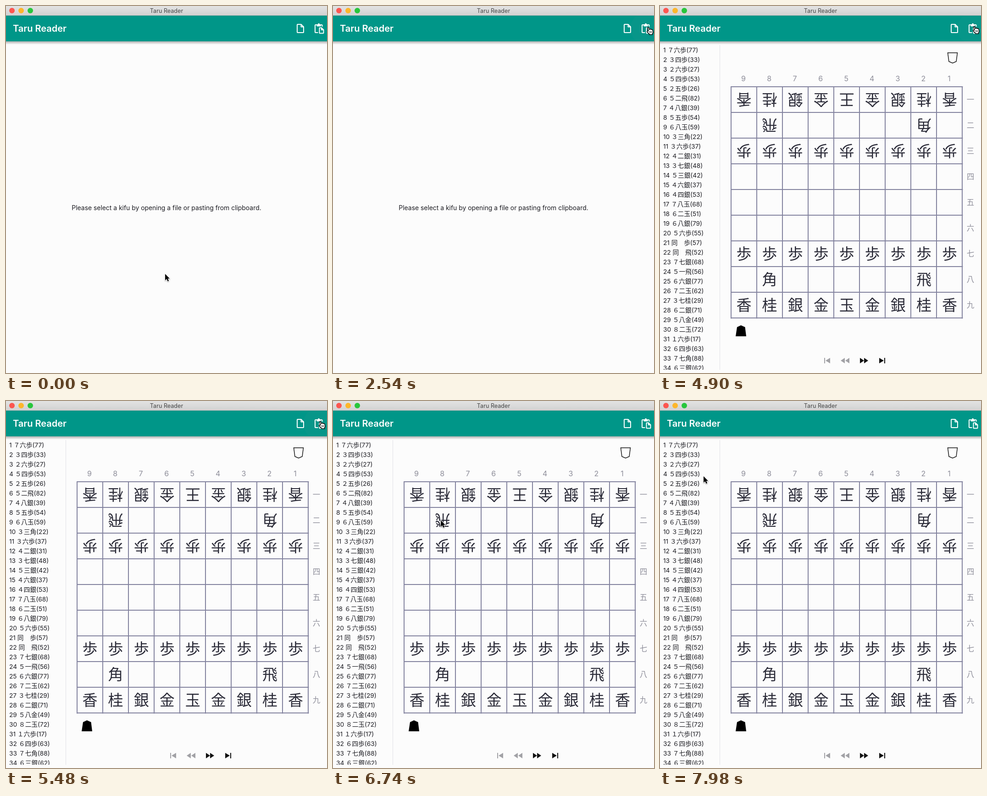
Recreate the animation shown at these times as an HTML page with a canvas. Size 700x800 px, loop 8 s.

```html
<!DOCTYPE html>
<html lang="ja">
<head>
<meta charset="utf-8">
<title>Taru Reader</title>
<style>
html, body { margin: 0; width: 100%; height: 100%; overflow: hidden; background: #fcfcfc; }
canvas { display: block; }
</style>
</head>
<body>
<canvas id="stage" width="700" height="800"></canvas>
<script>
const ctx = document.getElementById('stage').getContext('2d');
const LOOP = 8000, BOARD_AT = 4450;
const APP = 'Taru Reader';
const FONT = 'Inter, "Noto Sans CJK JP", "Noto Sans CJK", sans-serif';
const KANJI = '"Noto Sans CJK JP", "Noto Sans CJK", sans-serif';
const PAPER = '#fcfcfc', INK = '#1c1c22', LABEL = '#8e8e9a';
const LEFT = 155, TOP = 176, CELL = 56.05;

const MOVES = ('７六歩(77) ３四歩(33) ２六歩(27) ５四歩(53) ２五歩(26) ５二飛(82) ４八銀(39) ' +
  '５五歩(54) ６八玉(59) ３三角(22) ３六歩(37) ４二銀(31) ３七銀(48) ５三銀(42) ４六銀(37) ' +
  '４四銀(53) ７八玉(68) ６二玉(51) ６八銀(79) ５六歩(55) 同　歩(57) 同　飛(52) ７七銀(68) ' +
  '５一飛(56) ６六銀(77) ７二玉(62) ３七桂(29) ６二銀(71) ５八金(49) ８二玉(72) １六歩(17) ' +
  '６四歩(63) ７七角(88) ６三銀(62)').split(' ');

const SETUP = ['香桂銀金王金銀桂香', ' 飛     角 ', '歩歩歩歩歩歩歩歩歩', '', '', '',
  '歩歩歩歩歩歩歩歩歩', ' 角     飛 ', '香桂銀金玉金銀桂香'];

// Pointer stops: time, x, y
const PATH = [[0, 347, 584], [1000, 347, 584], [2110, 685, 46], [3000, 685, 46], [3500, 683, 44],
  [5900, 683, 44], [6650, 235, 260], [7000, 235, 260], [7750, 95, 164], [LOOP, 95, 164]];

function text(str, x, y, font, color, align = 'center') {
  ctx.font = font;
  ctx.fillStyle = color;
  ctx.textAlign = align;
  ctx.fillText(str, x, y);
}

function polygon(points) {
  ctx.beginPath();
  points.forEach(([x, y]) => ctx.lineTo(x, y));
  ctx.closePath();
}

function fillPolygon(points, color) {
  polygon(points);
  ctx.fillStyle = color;
  ctx.fill();
}

function disc(x, y, r, color) {
  ctx.beginPath();
  ctx.arc(x, y, r, 0, Math.PI * 2);
  ctx.fillStyle = color;
  ctx.fill();
}

function verticalFade(y0, y1, from, to) {
  const fade = ctx.createLinearGradient(0, y0, 0, y1);
  fade.addColorStop(0, from);
  fade.addColorStop(1, to);
  ctx.fillStyle = fade;
  ctx.fillRect(0, y0, 700, y1 - y0);
}

function strokePath(d, color, width) {
  ctx.strokeStyle = color;
  ctx.lineWidth = width;
  ctx.stroke(new Path2D(d));
}

function drawHeader(hover) {
  verticalFade(0, 21, '#e3e3e3', '#d1d1d1');
  ctx.fillStyle = '#b6b6b6';
  ctx.fillRect(0, 20, 700, 1);
  ['#fc5650', '#fdb62b', '#28c63c'].forEach((color, i) => disc(13 + i * 20, 10, 6, color));
  text(APP, 350, 15, `12.6px ${FONT}`, '#454545');

  verticalFade(77, 84, 'rgba(0,0,0,.3)', 'rgba(0,0,0,0)');
  ctx.fillStyle = '#009688';
  ctx.fillRect(0, 21, 700, 56);
  text(APP, 15, 56, `600 20px ${FONT}`, '#fff', 'left');

  if (hover > 0) {
    ctx.save();
    ctx.beginPath();
    ctx.rect(0, 21, 700, 56);
    ctx.clip();
    disc(682, 49, 34, `rgba(120,150,150,${hover})`);
    ctx.restore();
  }

  ctx.lineJoin = 'round';
  strokePath('M643.5 40H636a1 1 0 0 0-1 1V57a1 1 0 0 0 1 1H648a1 1 0 0 0 1-1V45.5L643.5 40V45.5H649', '#fff', 2);
  strokePath('M680.5 58H675a1 1 0 0 1-1-1V42a1 1 0 0 1 1-1H688.5a1 1 0 0 1 1 1V45', '#fff', 2);
  ctx.fillStyle = '#fff';
  ctx.fillRect(677.5, 40, 9, 4.5);
  disc(682, 40, 2.2, '#fff');
  strokePath('M688 47.5H684.5a1 1 0 0 0-1 1V58.5a1 1 0 0 0 1 1H691.5a1 1 0 0 0 1-1V52L688 47.5V52H692.5', '#fff', 2);
}

function drawMoves() {
  ctx.save();
  ctx.beginPath();
  ctx.rect(0, 84, 130, 709);
  ctx.clip();
  MOVES.forEach((move, i) => text(`${i + 1} ${move}`, 7, 101 + i * 21, `13.7px ${FONT}`, INK, 'left'));
  ctx.restore();
  ctx.fillStyle = '#e2e2e6';
  ctx.fillRect(130, 85, 1, 708);
}

function drawPiece(name, x, y, flipped) {
  ctx.save();
  ctx.translate(x, y);
  if (flipped) ctx.rotate(Math.PI);
  text(name, 0, 12, `33px ${KANJI}`, '#2b2b38');
  ctx.restore();
}

function drawBoard() {
  const size = CELL * 9;
  ctx.fillStyle = '#83839f';
  for (let i = 0; i < 10; i++) {
    const offset = Math.round(i * CELL) - 1;
    ctx.fillRect(LEFT + offset, TOP - 1, 2, size + 2);
    ctx.fillRect(LEFT - 1, TOP + offset, size + 2, 2);
  }
  for (let i = 0; i < 9; i++) {
    const middle = (i + 0.5) * CELL;
    text(9 - i, LEFT + middle - 1, 164, `16px ${FONT}`, LABEL);
    text('一二三四五六七八九'[i], 677, TOP + middle + 6, `16.5px ${KANJI}`, LABEL);
  }
  SETUP.forEach((row, r) => [...row].forEach((name, c) => {
    if (name !== ' ') drawPiece(name, LEFT + (c + 0.5) * CELL, TOP + (r + 0.5) * CELL, r < 3);
  }));

  ctx.lineJoin = 'miter';
  polygon([[627.5, 102], [648.5, 102], [646, 121], [638, 124.5], [630, 121]]);
  ctx.strokeStyle = '#151515';
  ctx.lineWidth = 1.5;
  ctx.stroke();
  fillPolygon([[165, 720], [188, 720], [185.5, 700], [176.5, 696], [168, 700]], '#000');
}

function triangle(x, direction, width, color) {
  fillPolygon([[x, 767], [x + direction * width, 773], [x, 779]], color);
}

function drawControls() {
  const pale = '#a2a2a6', dark = '#111';
  ctx.fillStyle = pale;
  ctx.fillRect(358, 767, 2, 12);
  triangle(371, -1, 10, pale);
  triangle(403, -1, 9, pale);
  triangle(413, -1, 9, pale);
  triangle(436, 1, 9, dark);
  triangle(445, 1, 9, dark);
  triangle(478, 1, 10, dark);
  ctx.fillRect(489, 767, 2, 12);
}

function pointerAt(t) {
  const next = PATH.findIndex(([time]) => time > t);
  const [t0, x0, y0] = PATH[next - 1], [t1, x1, y1] = PATH[next];
  const k = (1 - Math.cos(Math.PI * (t - t0) / (t1 - t0))) / 2;
  return [x0 + (x1 - x0) * k, y0 + (y1 - y0) * k];
}

const ARROW = new Path2D('M0 0V14L3.3 11L5.7 16.2L8.1 15.1L5.8 10.2H10Z');
const HAND = new Path2D('M3 9L1 1.7Q1-.2 2.9.6L5 6V4.6Q6.5 3.6 7.3 5Q8.8 3.9 9.7 5.6Q11.5 4.9 12 6.7' +
  'L12.8 11Q12.8 13 11.5 14.2V16H5.2Q4.4 13.8 1.4 11.7Q-.6 9.6.6 8.6Q1.8 8 3 9Z');

function drawPointer(x, y, overIcon) {
  ctx.save();
  ctx.translate(x, y);
  ctx.lineJoin = 'round';
  ctx.strokeStyle = overIcon ? '#000' : '#fff';
  ctx.fillStyle = overIcon ? '#fff' : '#000';
  ctx.lineWidth = overIcon ? 1.2 : 2;
  const shape = overIcon ? HAND : ARROW;
  ctx.shadowColor = 'rgba(0,0,0,.35)';
  ctx.shadowBlur = 2;
  ctx.shadowOffsetY = 1;
  ctx.stroke(shape);
  ctx.shadowColor = 'transparent';
  ctx.fill(shape);
  if (overIcon) {
    ctx.stroke(shape);
    strokePath('M5.6 9V12.5M7.7 9V12.5M9.8 9V12.5', '#000', 0.9);
  }
  ctx.restore();
}

function draw(t) {
  const [x, y] = pointerAt(t);
  const overIcon = x > 658 && y > 21 && y < 77;
  const pressed = Math.max(0, Math.min(1, (t - 3900) / 200, (4600 - t) / 300));
  ctx.fillStyle = PAPER;
  ctx.fillRect(0, 0, 700, 800);
  drawHeader(overIcon ? 0.06 + 0.16 * pressed : 0);
  if (t < BOARD_AT) {
    text('Please select a kifu by opening a file or pasting from clipboard.', 350, 445, `13.9px ${FONT}`, INK);
  } else {
    drawMoves();
    drawBoard();
    drawControls();
  }
  drawPointer(x, y, overIcon);
}

const start = performance.now();
function tick() {
  draw((performance.now() - start) % LOOP);
  requestAnimationFrame(tick);
}
tick();
</script>
</body>
</html>
```
